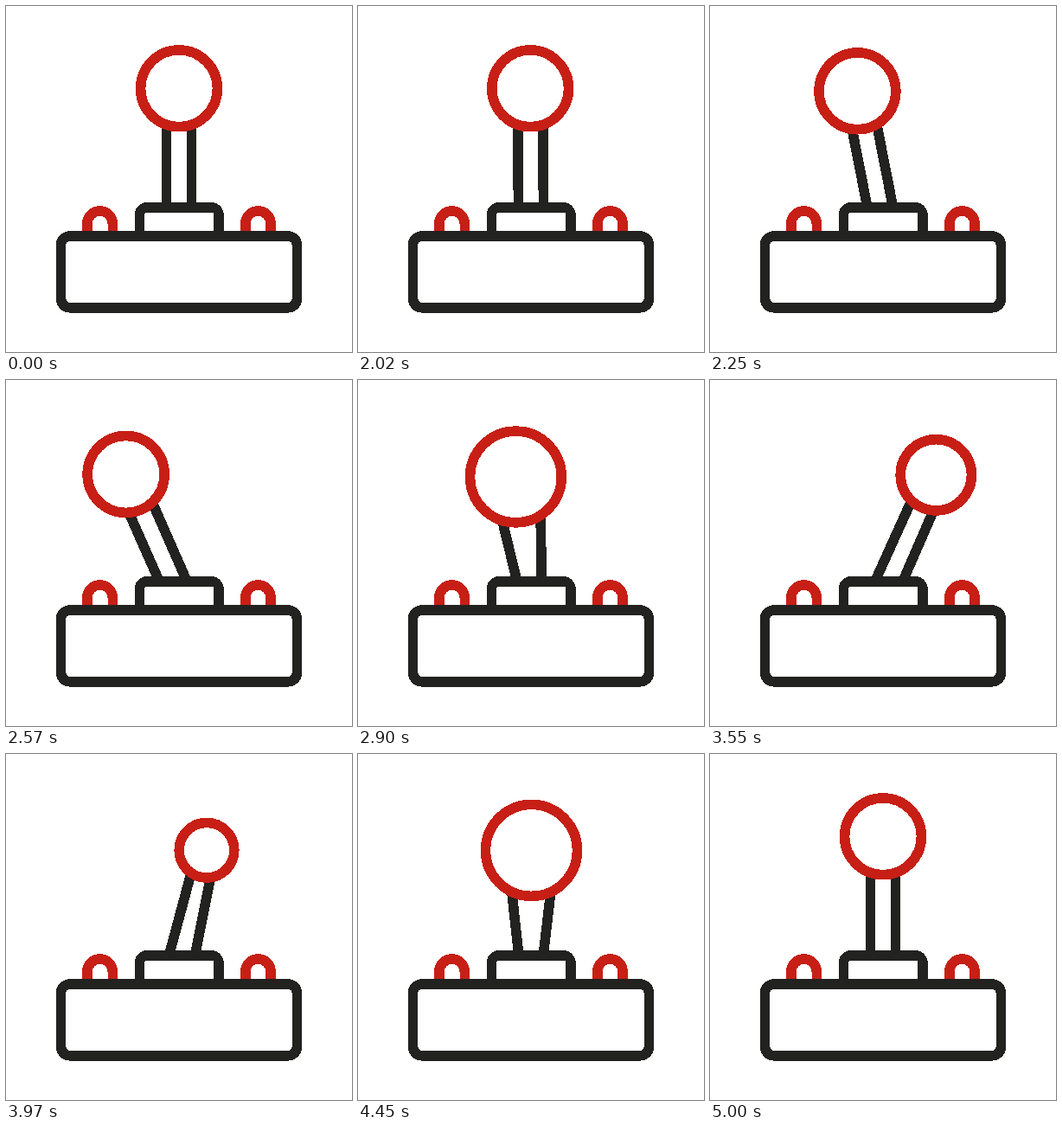
Animation of 400 by 400 pixels, one loop 5.02 s. Source, as an HTML page:

```html
<!DOCTYPE html>
<html lang="en">
<head>
<meta charset="utf-8">
<title>Joystick</title>
<style>
  html, body { margin: 0; width: 100%; height: 100%; overflow: hidden; background: #fff; }
  svg { display: block; width: 400px; height: 400px; shape-rendering: crispEdges; }
  svg * { fill: #fff; stroke: #222221; stroke-width: 11.6; }
  svg .red { stroke: #c71f16; }
</style>
</head>
<body>
<svg viewBox="0 0 400 400">
  <line id="left"/>
  <line id="right"/>
  <circle id="ball" class="red"/>
  <path class="red" d="M93.9 264V251.7a14.7 14.7 0 0 1 29.4 0V264"/>
  <path class="red" d="M276.7 264V251.7a14.7 14.7 0 0 1 29.4 0V264"/>
  <path d="M154.4 266V241.7a9 9 0 0 1 9-9H237a9 9 0 0 1 9 9V266"/>
  <rect x="63.5" y="266" width="273" height="82.8" rx="10.5"/>
</svg>
<script>
const LOOP = 5020, MOVE_START = 2020;
const PIVOT = { x: 200, y: 240 }, ARM = 144.7;

// Sideways tilt in degrees, and depth: 1 is fully forward, -1 fully back.
const SWAY = [[1980, 0], [2545, -25.2], [3420, 26], [4510, 0]];
const DEPTH = [[2545, 0], [2935, 1], [3990, -1], [4465, 1], [4980, 0]];

const [left, right, ball] = ['left', 'right', 'ball'].map(id => document.getElementById(id));
const rad = deg => deg * Math.PI / 180;
const ease = p => 0.5 - 0.5 * Math.cos(Math.PI * p);

function track(keys, t) {
  if (t <= keys[0][0]) return keys[0][1];
  for (let i = 1; i < keys.length; i++) {
    const [t0, v0] = keys[i - 1], [t1, v1] = keys[i];
    if (t < t1) return v0 + (v1 - v0) * ease((t - t0) / (t1 - t0));
  }
  return keys[keys.length - 1][1];
}

function set(el, attrs) {
  for (const name in attrs) el.setAttribute(name, attrs[name]);
}

function draw(t) {
  const moving = t >= MOVE_START;
  const sway = moving ? track(SWAY, t) : 0;
  const depth = moving ? track(DEPTH, t) : 0;
  const pick = (front, back) => depth * (depth > 0 ? front : back);

  const tilt = Math.hypot(sway, pick(27.4, 24));
  const x = PIVOT.x + ARM * Math.sin(rad(sway));
  const y = PIVOT.y - ARM * Math.cos(rad(tilt));
  set(ball, { cx: x, cy: y, r: 44.4 + pick(8.6, 12.6) });

  const half = 14.5 / Math.cos(rad(sway));
  const top = half + pick(13.5, 4);
  const baseX = PIVOT.x + sway * 0.32;
  set(left, { x1: baseX - half, y1: 230, x2: x - top, y2: y });
  set(right, { x1: baseX + half, y1: 230, x2: x + top, y2: y });
}

const start = performance.now();
function tick() {
  draw((performance.now() - start) % LOOP);
  requestAnimationFrame(tick);
}
tick();
</script>
</body>
</html>
```
